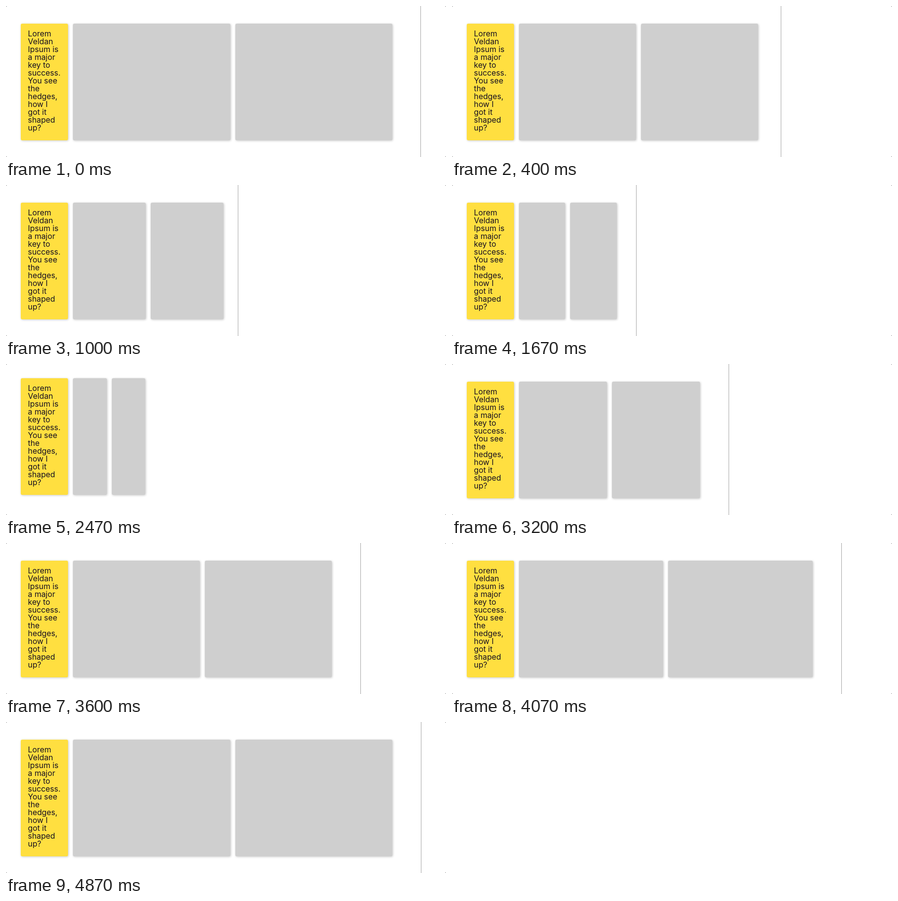
Write an HTML page without scripts that moves like this. It is 894 px wide and 308 px high and loops after 4940 ms.

```html
<!DOCTYPE html>
<html lang="en">
<head>
<meta charset="utf-8">
<title>Resizable cards</title>
<style>
  html, body {
    margin: 0;
    width: 100%;
    height: 100%;
    overflow: hidden;
    background: #8c8c8c;
  }
  .stage {
    position: relative;
    width: 894px;
    height: 308px;
    overflow: hidden;
    border-radius: 3px;
    background: #fff;
  }
  .row, .edge, .card { box-sizing: border-box; }
  .row, .edge { animation: 4940ms linear infinite; }

  .row {
    position: absolute;
    left: 30px;
    top: 36px;
    width: 755px;
    height: 238px;
    display: flex;
    gap: 10px;
    animation-name: fit, lift;
  }
  .card {
    flex: 1;
    border-radius: 3px;
    background: #cfcfcf;
    box-shadow: 1px 1px 4px rgba(0, 0, 0, .22);
  }
  .note {
    flex: 0 0 96px;
    padding: 13px 0 0 14.6px;
    background: #ffdf40;
    color: #150f20;
    font: 15.8px/16px Inter, Arial, sans-serif;
    white-space: pre;
  }
  .edge {
    position: absolute;
    left: 842px;
    top: 0;
    width: 1px;
    height: 308px;
    background: #a6a6a6;
    animation-name: drag, hide;
  }

  /* the divider being dragged in and out */
  @keyframes drag {
    0%, 1.4% { left: 842px; }
    10.7% { left: 601px; }
    20.24% { left: 471px; }
    22.9%, 27% { left: 463px; }
    33.8% { left: 374px; }
    37.85% { left: 359px; }
    48.6%, 50% { left: 341px; }
    52.6% { left: 350px; }
    59.3%, 64.9% { left: 562px; }
    70.2% { left: 599px; }
    72.87% { left: 720px; }
    81% { left: 762px; }
    85%, 100% { left: 843px; }
  }
  /* the cards follow, a little late on the way in */
  @keyframes fit {
    0%, 1.4% { width: 755px; }
    10.7% { width: 530px; }
    20.24% { width: 412px; }
    23.5%, 27.5% { width: 375px; }
    33.8% { width: 305px; }
    38.8% { width: 271px; }
    48.6%, 50.5% { width: 253px; }
    52.6% { width: 262px; }
    59.3%, 64.9% { width: 474px; }
    70.2% { width: 511px; }
    72.87% { width: 632px; }
    81% { width: 674px; }
    85%, 100% { width: 755px; }
  }
  /* narrowest state: cards jump up and the divider is gone */
  @keyframes lift {
    0%, 49.9% { top: 36px; }
    49.91%, 52.6% { top: 29px; }
    52.61%, 100% { top: 36px; }
  }
  @keyframes hide {
    0%, 49.9% { opacity: 1; }
    49.91%, 52.6% { opacity: 0; }
    52.61%, 100% { opacity: 1; }
  }
</style>
</head>
<body>
<div class="stage">
  <div class="row">
    <div class="card note">Lorem
Veldan
Ipsum is
a major
key to
success.
You see
the
hedges,
how I
got it
shaped
up?</div>
    <div class="card"></div>
    <div class="card"></div>
  </div>
  <div class="edge"></div>
</div>
</body>
</html>
```
